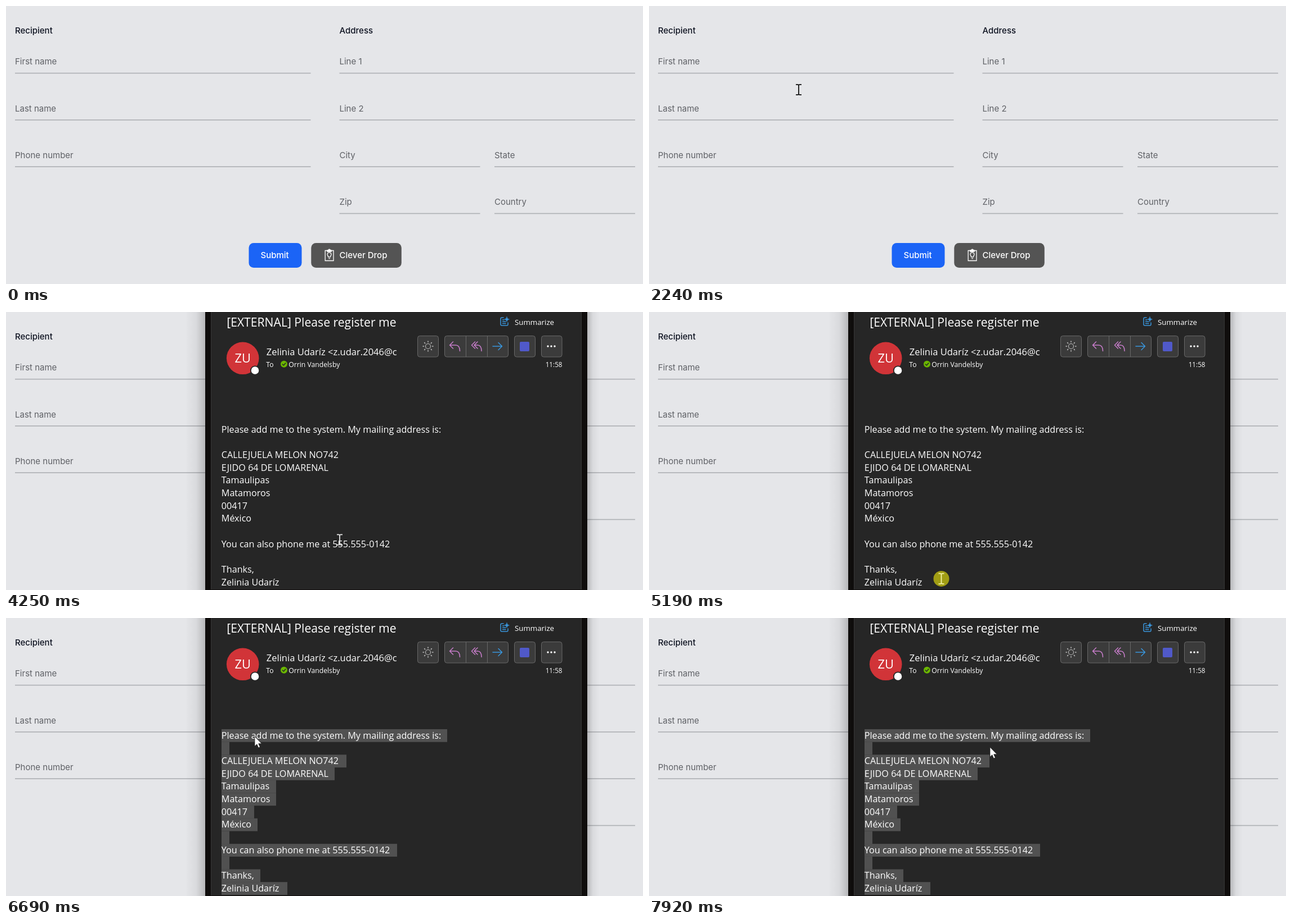
These frames come from a looping animation (1132 px wide and 495 px high, 8000 ms). An HTML page:

```html
<!DOCTYPE html>
<html lang="en">
<head>
<meta charset="utf-8">
<title>Address form</title>
<style>
html, body { margin: 0; width: 100%; height: 100%; overflow: hidden; background: #e5e6e9; }
svg { display: block; }
text { white-space: pre; }
.form { font: 400 15px Inter, sans-serif; fill: #5f6166; }
.form .head { font-weight: 500; fill: #0d1220; }
.form .btn { font-weight: 500; fill: #fff; }
.mail { font-family: "Open Sans", "Noto Sans", sans-serif; fill: #fff; }
.box { fill: #3b3b3b; stroke: #686868; }
.ico { fill: none; stroke-width: 1.5; stroke-linecap: round; stroke-linejoin: round; }
</style>
</head>
<body>
<svg width="1132" height="495" viewBox="0 0 1132 495">
  <defs>
    <linearGradient id="shade">
      <stop offset="0" stop-color="#000" stop-opacity="0"/>
      <stop offset=".55" stop-color="#000" stop-opacity=".05"/>
      <stop offset="1" stop-color="#000" stop-opacity=".2"/>
    </linearGradient>
    <clipPath id="fromClip"><rect x="455" y="55" width="242" height="30"/></clipPath>
  </defs>
  <rect width="1132" height="495" fill="#e5e6e9"/>

  <g class="form">
    <text class="head" x="16" y="49">Recipient</text>
    <text class="head" x="592.5" y="49">Address</text>
    <g id="fields"></g>
    <rect x="431.5" y="422" width="94" height="44" rx="8.5" fill="#1b64f6"/>
    <text class="btn" x="452.5" y="449.4">Submit</text>
    <rect x="542.3" y="422" width="160.5" height="44" rx="8.5" fill="#545454"/>
    <text class="btn" x="592.5" y="449.4">Clever Drop</text>
    <g fill="none" stroke="#fff" stroke-width="1.3">
      <path d="M571 435.5H567.2V453.5H582V435.5H578"/>
      <path d="M571 437.3V434.8H573a1.6 1.6 0 0 1 3.2 0H578V437.3Z" fill="#fff"/>
      <path d="M573 447.2C573 445.5 571 444.8 571 442.3a3.5 3.5 0 0 1 7 0C578 444.8 576 445.5 576 447.2ZM573.2 449.6H576"/>
    </g>
    <rect id="caret" x="16" y="90" width="1.5" height="19" fill="#22252c"/>
  </g>

  <g id="mail" class="mail">
    <rect x="318" width="36" height="495" fill="url(#shade)"/>
    <rect width="22" height="495" fill="url(#shade)" transform="translate(1055 0) scale(-1 1)"/>
    <rect x="354" width="679" height="495" fill="#0f0d0c"/>
    <rect x="364" width="659" height="494" fill="#262626"/>
    <path d="M364.5 0V494M1022.5 0V494" stroke="#363636"/>
    <text x="392.2" y="25.7" font-size="21.15">[EXTERNAL] Please register me</text>

    <g class="ico" stroke="#3a96dd">
      <path d="M884 10H881a2 2 0 0 0-2 2V22a2 2 0 0 0 2 2H890a2 2 0 0 0 2-2V19M882.5 14H885M882.5 17.2H888M882.5 20.4H888"/>
      <path d="M890 8.5Q890.5 12.5 894.5 13Q890.5 13.5 890 17.5Q889.5 13.5 885.5 13Q889.5 12.5 890 8.5Z" fill="#3a96dd" stroke-width=".5"/>
    </g>
    <text x="904" y="22.6" font-size="13.3">Summarize</text>

    <rect class="box" x="731.5" y="42.5" width="37" height="37.5" rx="4"/>
    <rect class="box" x="779.5" y="42.5" width="113" height="37.5" rx="4"/>
    <rect class="box" x="903.5" y="42.5" width="37" height="37.5" rx="4"/>
    <rect class="box" x="951.5" y="42.5" width="36.5" height="37.5" rx="4"/>
    <path d="M817.5 42.5V80M855.5 42.5V80" stroke="#686868"/>
    <g class="ico" stroke="#bdbdbd" stroke-width="1">
      <circle cx="750" cy="61" r="4.5" stroke-width="1.1"/>
      <g id="rays"></g>
    </g>
    <g class="ico" stroke="#c77dca">
      <path d="M794.5 53L788.5 59L794.5 65M788.5 59H799Q806.5 59 806.5 69.5"/>
      <path d="M833.5 53L827.5 59L833.5 65M838 53L832 59L838 65M832 59H838Q845 59 845 69.5"/>
    </g>
    <path class="ico" stroke="#3a96dd" d="M865 61H881.5M875 54.5L881.5 61L875 67.5"/>
    <rect x="913" y="53" width="17" height="17" rx="2" fill="#5059c9"/>
    <g fill="#fff"><circle cx="963" cy="61" r="1.7"/><circle cx="969" cy="61" r="1.7"/><circle cx="975" cy="61" r="1.7"/></g>

    <circle cx="420.7" cy="82.3" r="28.8" fill="#d13438"/>
    <text x="420.7" y="90.3" font-size="22" text-anchor="middle">ZU</text>
    <circle cx="442.5" cy="104" r="8.6" fill="#262626"/>
    <circle cx="442.5" cy="104" r="6.8" fill="#fff"/>
    <g clip-path="url(#fromClip)">
      <text x="462.8" y="77.3" font-size="16.55">Zelinia Udaríz &lt;z.udar.2046@c</text>
    </g>
    <text x="462.3" y="98" font-size="12.2">To</text>
    <circle cx="494" cy="92.7" r="6" fill="#6bb700"/>
    <path class="ico" stroke="#262626" d="M491.3 93L493.3 95L496.8 91"/>
    <text x="502.3" y="98" font-size="12.2">Orrin Vandelsby</text>
    <text x="988.5" y="97.7" font-size="11.7" text-anchor="end">11:58</text>
    <g id="marks" fill="#515151"></g>
    <g id="lines" font-size="16.17"></g>
  </g>

  <circle id="halo" r="14" fill="#a19d14"/>
  <path id="beam" fill="none" stroke-width="1.8" d="M-5 -9.2H-1.5L0 -8.2L1.5 -9.2H5M0 -8.2V8.2M-5 9.2H-1.5L0 8.2L1.5 9.2H5"/>
  <path id="arrow" fill="#fff" stroke="#1a1a1a" stroke-width=".7" d="M0 0V17.3L3.9 13.7L6.6 20L9.4 18.8L6.7 12.7H12.3Z"/>
</svg>
<script>
const LOOP = 8000, ROW = 22.68, TOP = 198, LEFT = 383;
const $ = id => document.getElementById(id);
const add = (parent, tag, attrs, text) => {
  const el = document.createElementNS("http://www.w3.org/2000/svg", tag);
  for (const k in attrs) el.setAttribute(k, attrs[k]);
  if (text) el.textContent = text;
  parent.append(el);
  return el;
};
const show = (el, on) => el.setAttribute("visibility", on ? "visible" : "hidden");

// label, x, row, width
[["First name", 16, 0, 525.5], ["Last name", 16, 1, 525.5], ["Phone number", 16, 2, 525.5],
 ["Line 1", 592.5, 0, 525.5], ["Line 2", 592.5, 1, 525.5],
 ["City", 592.5, 2, 250], ["State", 868, 2, 250],
 ["Zip", 592.5, 3, 250], ["Country", 868, 3, 250]
].forEach(([label, x, row, width]) => {
  const y = row * 83.3;
  add($("fields"), "text", { x, y: 104.3 + y }, label);
  add($("fields"), "rect", { x, y: 118.8 + y, width, height: 1.6, fill: "#adafb3" });
});

for (let i = 0; i < 8; i++)
  add($("rays"), "path", { d: "M0 -7.5V-9", transform: `translate(750 61) rotate(${i * 45})` });

// text and right edge of its selection
const mail = [
  ["Please add me to the system. My mailing address is:", 784], ["", 397],
  ["CALLEJUELA MELON NO742", 605], ["EJIDO 64 DE LOMARENAL", 584],
  ["Tamaulipas", 480], ["Matamoros", 480], ["00417", 441], ["México", 447], ["", 397],
  ["You can also phone me at 555.555-0142", 695], ["", 397],
  ["Thanks,", 452], ["Zelinia Udaríz", 500]
];
const marks = mail.map(([text], i) => {
  if (text) add($("lines"), "text", { x: LEFT - .2, y: 214.6 + i * ROW }, text);
  return add($("marks"), "rect", { y: TOP + i * ROW, height: ROW + .1 });
});

// pointer: time, x, y
const path = [
  [590, 546, 437], [1120, 265.5, 116.5], [1450, 265.5, 116.5], [1540, 265.5, 124], [1690, 265.5, 124],
  [1880, 266, 149], [3490, 266, 149], [4250, 593, 405.5], [4330, 593, 405.5], [4480, 601, 400],
  [4900, 521, 487], [5120, 522, 478], [5160, 522, 478], [5560, 364, 242], [5730, 363, 202],
  [5960, 363, 202], [6130, 415, 219], [6310, 442, 211], [6930, 442, 211], [7180, 668, 246],
  [7410, 606, 230], [LOOP, 606, 230]
];
const rate = (i, k) => (path[i + 1][k] - path[i][k]) / (path[i + 1][0] - path[i][0]);
const slope = (i, k) => {
  if (i === 0 || i === path.length - 1) return 0;
  const a = rate(i - 1, k), b = rate(i, k);
  return a * b > 0 ? 2 * a * b / (a + b) : 0;
};
// monotone cubic through the points
function along(t, k) {
  let i = 0;
  while (i < path.length - 2 && t >= path[i + 1][0]) i++;
  const [p, q] = [path[i], path[i + 1]], h = q[0] - p[0];
  const u = Math.min(1, Math.max(0, (t - p[0]) / h)), v = 1 - u;
  return p[k] * v * v * (1 + 2 * u) + q[k] * u * u * (3 - 2 * u)
    + h * u * v * (v * slope(i, k) - u * slope(i + 1, k));
}

function select(t) {
  const at = Math.min(t, 5730), x = along(at, 1), y = along(at, 2);
  const row = Math.floor((y + 2 - TOP) / ROW);
  marks.forEach((m, i) => {
    const right = mail[i][1];
    const from = i === row ? Math.min(right, Math.max(LEFT, x)) : LEFT;
    m.setAttribute("x", from);
    m.setAttribute("width", t >= 5160 && i >= row ? right - from : 0);
  });
}

function draw(t) {
  show($("caret"), t >= 590 && t < 1130 || t >= 1690 && t < 2240);
  $("mail").setAttribute("opacity", t < 2620 ? 0 : t < 2720 ? .85 : 1);
  select(t);

  const x = along(t, 1), y = along(t, 2), held = t >= 5160 && t < 5960;
  const arrow = t >= 590 && t < 950 || t >= 1500 && t < 1880 || t >= 6050;
  const pos = `translate(${x.toFixed(2)} ${y.toFixed(2)})`;
  for (const id of ["halo", "beam", "arrow"]) $(id).setAttribute("transform", pos);
  show($("halo"), held);
  show($("arrow"), arrow);
  show($("beam"), t >= 590 && !arrow);
  $("beam").setAttribute("stroke", held ? "#f3f1a4" : t > 2620 && x > 354 ? "#e4e4e4" : "#111");
}

let start;
function tick(now) {
  start ??= now;
  draw((now - start) % LOOP);
  requestAnimationFrame(tick);
}
draw(0);
requestAnimationFrame(tick);
</script>
</body>
</html>
```
